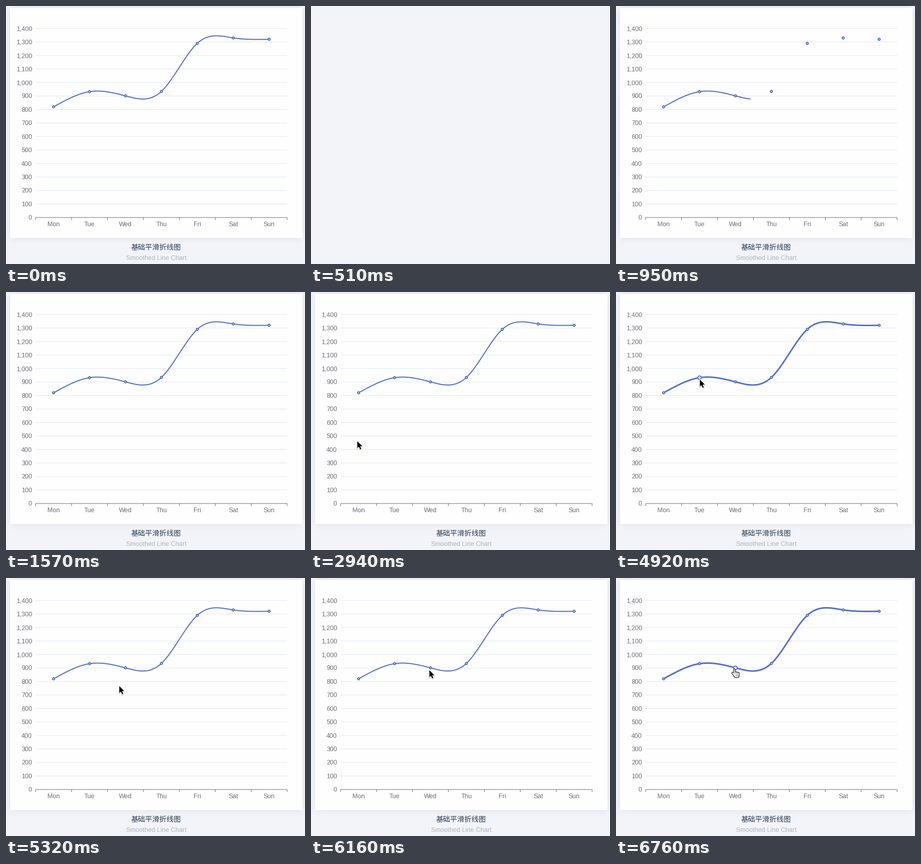
Recreate the animation shown at these times as a matplotlib script. Size 585 by 505 pixels, loop 8 s.

```python
import numpy as np
import matplotlib.pyplot as plt
from matplotlib.animation import FuncAnimation
from matplotlib.patches import Circle, Polygon, Rectangle

W, H, DPI = 585, 505, 100
LOOP, STEP = 8000, 20
PX = 72 / DPI                      # points per pixel
PAGE, CARD, BLUE = "#f3f4f9", "#fefefe", "#5470c6"
AXIS, GRID = "#6e7079", "#e0e6f1"
LEFT, RIGHT, BASE, TOP = 58, 550, 414, 44
DAYS = "Mon Tue Wed Thu Fri Sat Sun".split()
VALUES = np.array([820, 932, 901, 934, 1290, 1330, 1320])

fig = plt.figure(figsize=(W / DPI, H / DPI), dpi=DPI, facecolor=PAGE)
ax = fig.add_axes([0, 0, 1, 1])
ax.set(xlim=(0, W), ylim=(H, 0))
ax.axis("off")


def label(x, y, text, color, size=12.5, ha="center", font="Liberation Sans"):
    ax.text(x, y, text, fontsize=size * PX, color=color, ha=ha, va="baseline", family=font)


def rule(xs, ys, color, z):
    ax.plot(xs, ys, color=color, lw=PX, zorder=z, solid_capstyle="butt", snap=False)


def natural_spline(points_x, points_y, per_segment=120):
    """Natural cubic spline through evenly spaced points."""
    n = len(points_y)
    system = np.diag([2.0] + [4.0] * (n - 2) + [2.0]) + np.eye(n, k=1) + np.eye(n, k=-1)
    padded = np.pad(points_y, 1, mode="edge")
    slope = np.linalg.solve(system, 3 * (padded[2:] - padded[:-2]))
    u = np.linspace(0, n - 1, (n - 1) * per_segment + 1)
    i = np.minimum(u.astype(int), n - 2)
    s = u - i
    y = ((1 + 2 * s) * (1 - s) ** 2 * points_y[i] + s * (1 - s) ** 2 * slope[i]
         + s * s * (3 - 2 * s) * points_y[i + 1] + s * s * (s - 1) * slope[i + 1])
    return np.interp(u, np.arange(n), points_x), y


def draw_card(x0=8, y0=4, x1=580, y1=454):
    def falloff(count, lo, hi, blur=4.7):
        v = np.arange(count) + 0.5
        return 1 / (1 + np.exp((lo - v) / blur)) / (1 + np.exp((v - hi) / blur))

    shadow = np.zeros((H, W, 4))
    shadow[..., 3] = 0.08 * np.outer(falloff(H, y0, y1), falloff(W, x0, x1))
    ax.imshow(shadow, extent=(0, W, H, 0), aspect="auto", interpolation="nearest", zorder=0)
    ax.add_patch(Rectangle((x0, y0), x1 - x0, y1 - y0, fc=CARD, lw=0, zorder=1))


def draw_axes():
    for value in range(0, 1500, 100):
        y = to_y(value)
        label(51, y + 4.3, f"{value:,}", AXIS, ha="right")
        if value:
            rule([LEFT, RIGHT], [y, y], GRID, 2)
    rule([LEFT, RIGHT], [BASE, BASE], AXIS, 3)
    for x in np.linspace(LEFT, RIGHT, 8):
        rule([x, x], [BASE, BASE + 5], AXIS, 3)
    for x, day in zip(px, DAYS):
        label(x, 430.7, day, AXIS)


def to_y(value):
    return BASE - value * (BASE - TOP) / 1400


px = LEFT + (np.arange(7) + 0.5) * (RIGHT - LEFT) / 7
py = to_y(VALUES)
draw_card()
draw_axes()
label(293.7, 477.3, "基础平滑折线图", "#293c55", 14, font="Noto Sans CJK JP")
label(293.7, 497, "Smoothed Line Chart", "#b0b3bb")

curve_x, curve_y = natural_spline(px, py)
curve, = ax.plot([], [], color=BLUE, zorder=4, solid_capstyle="butt", solid_joinstyle="bevel")
dots = [ax.add_patch(Circle(p, 2, fc="white", ec=BLUE, lw=2 * PX, zorder=5)) for p in zip(px, py)]


def arrow_layer(color, width, drop=0, **style):
    patch = ax.add_patch(Polygon(ARROW, fc=color, ec=color, lw=width * PX,
                                 joinstyle="round", **style))
    return patch.set_xy, ARROW + [0, drop], patch


def hand_layer(color, width, drop=0, **style):
    line, = ax.plot([], [], color=color, lw=width * PX, solid_capstyle="round",
                    snap=False, **style)
    return lambda points: line.set_data(*points.T), HAND + [0, drop], line


# Pointer shapes relative to the hot spot; the hand is a set of round strokes.
ARROW = np.array([(0.6, 1), (0.6, 14.6), (3.7, 11.7), (6.1, 17), (8.3, 16), (6, 10.9), (10.4, 10.7)])
GAP = (np.nan, np.nan)
HAND = [(-3.4, 8.4), (0.8, 13.2), GAP, (1.6, 15.6), (7.4, 15.6), GAP]
for finger in range(4):
    x = 2.7 * finger
    HAND += [(x, 7 + 0.5 * finger if finger else 2), (x, 13.5), GAP]
HAND = np.array(HAND)

arrow = [arrow_layer("black", 2.6, 1.2, alpha=0.14, zorder=6),
         arrow_layer("white", 2, zorder=7),
         arrow_layer("black", 0, zorder=8)]
hand = [hand_layer("black", 4.2, 1.2, alpha=0.12, zorder=6),
        hand_layer("black", 4.2, zorder=7),
        hand_layer("white", 2.2, zorder=8)]
cover = ax.add_patch(Rectangle((0, 0), W, H, fc=PAGE, lw=0, zorder=10))

APPEAR, TUE_ON, TUE_OFF, WED_ON = 2940, 3780, 4920, 6460
ENTRY = np.array([90, 291])
# Start time, end time and destination of each pointer move.
MOVES = [(2990, 3060, (231, 281.5)), (3260, 3650, (195, 168.5)), (3740, TUE_ON, (162, 169.5)),
         (TUE_OFF, 5330, (221, 210.5)), (5350, 5710, (242, 204)), (5770, 6160, (231, 179.5)),
         (6430, WED_ON, (231.5, 177.5))]


def progress(t, start, end):
    return np.clip((t - start) / (end - start), 0, 1)


def eased(t, start, duration=300):
    return 1 - (1 - progress(t, start, start + duration)) ** 3


def pointer(t):
    spot = ENTRY
    for start, end, goal in MOVES:
        spot = spot + (np.array(goal) - spot) * progress(t, start, end)
    return spot


def place(layers, spot, visible):
    for move, shape, artist in layers:
        artist.set_visible(visible)
        move(shape + spot)


def update(frame):
    t = frame * STEP + STEP / 2
    cover.set_visible(510 <= t < 660)

    head = W if t < 510 else np.interp(t, [660, 950, 1570], [110, 263, 515.5])
    shown = curve_x <= head
    curve.set_data(curve_x[shown], curve_y[shown])

    tue = eased(t, TUE_ON) - eased(t, TUE_OFF)
    wed = eased(t, WED_ON)
    curve.set_linewidth((2 + tue + wed) * PX)
    dots[1].set_radius(2 + 1.5 * tue)
    dots[2].set_radius(2 + 1.5 * wed)

    spot = pointer(t)
    pointing = TUE_ON <= t < TUE_OFF or t >= WED_ON
    place(arrow, spot, t >= APPEAR and not pointing)
    place(hand, spot, pointing)
    return []


anim = FuncAnimation(fig, update, frames=LOOP // STEP, interval=STEP, repeat=True,
                     repeat_delay=0, blit=False)
plt.show()
```
